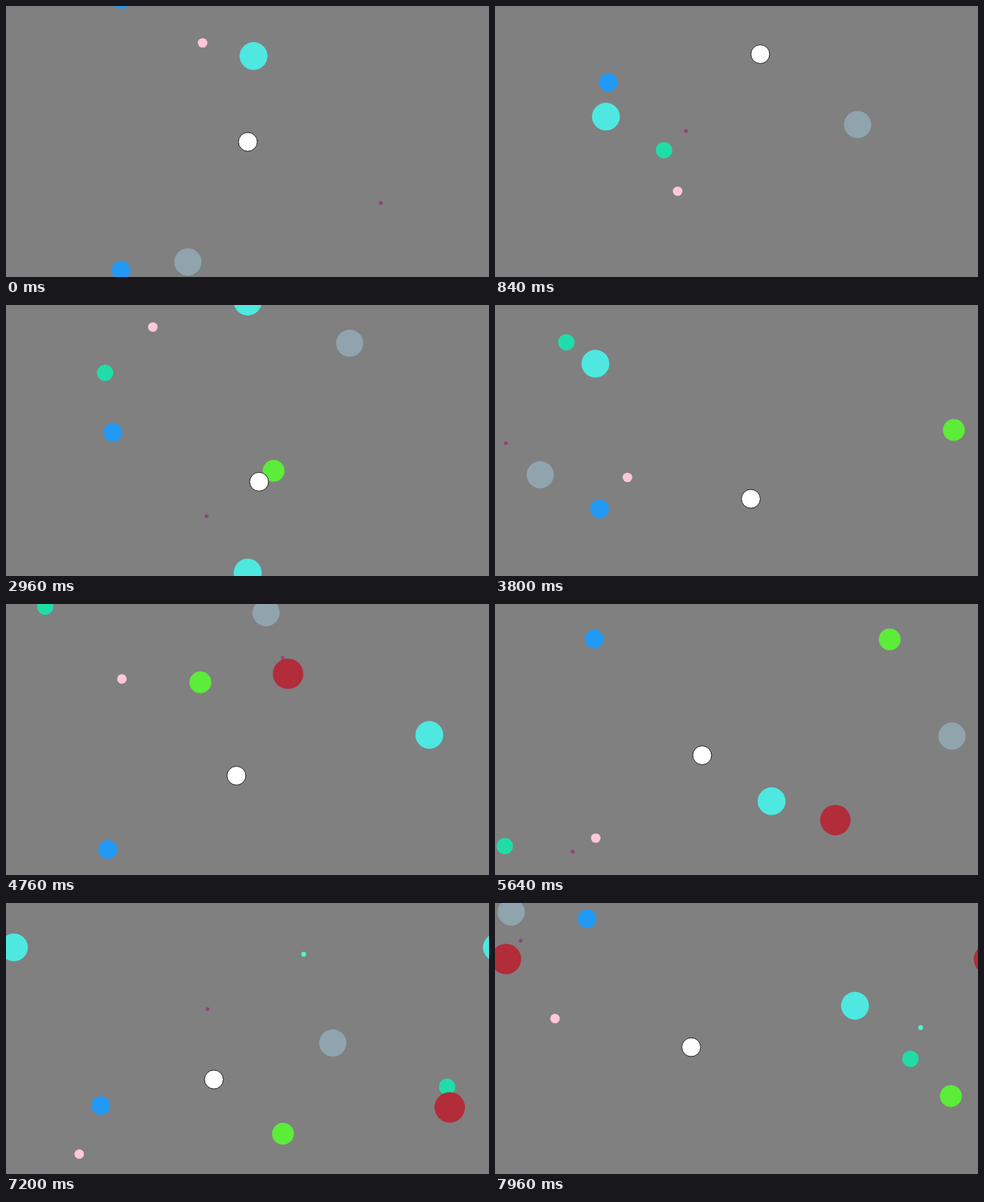
An HTML page with a canvas for the animation above (8000 ms loop, 640x360 px).

```html
<!DOCTYPE html>
<html lang="en">
<head>
<meta charset="utf-8">
<title>Drifting balls</title>
<style>
  html, body { margin: 0; height: 100%; overflow: hidden; background: #808080; }
  canvas { display: block; width: 640px; height: 360px; }
</style>
</head>
<body>
<canvas id="stage" width="640" height="360"></canvas>
<script>
const ctx = document.getElementById('stage').getContext('2d');
const W = 640, H = 360, STEP = 40, STEPS = 200;
const FIRST_BIRTH = 11, BIRTH_GAP = 50;

// Steps at which the paths below have their points; shorter paths end together with the long ones.
const keys = [0, 21, 52, 95, 141, 180, 199];

// Paths are unwrapped: the stage is a torus, so positions may run far past its edges.
const balls = [
  { color: '#2299f5', r: 12.5,
    x: [152.5, 150, 145, 138.5, 131.5, 125.5, 122],
    y: [351, 101.5, -280, -809, -1393.5, -1891, -2139] },
  { color: '#4ee8e0', r: 18.5,
    x: [328, 147, -123.5, -507, -913.5, -1269.5, -1443],
    y: [66.5, 147, 269, 438, 622, 779, 856.5] },
  { color: '#ffc8da', r: 6.3,
    x: [260.5, 242, 214.5, 175.5, 133.5, 97, 79.5],
    y: [49, 246, 540, 949, 1391, 1773.5, 1953.5] },
  { color: '#90a4ae', r: 18,
    x: [241, 480.5, 839, 1340, 1885.5, 2353, 2581.5],
    y: [340, 157.5, -115, -494.5, -904.5, -1254, -1428] },
  { color: '#96427c', r: 2.6,
    x: [496.5, 253, -111, -625.5, -1177, -1653, -1886],
    y: [261.5, 166, 22, -176.5, -391, -579, -670] }
];

// These join one after another at a steady interval.
const newcomers = [
  { color: '#20dda8', r: 10.8,
    x: [224, 170, 94.5, 13, -55.5, -89.5],
    y: [191.5, 132.5, 49.5, -38.5, -116, -153] },
  { color: '#5cec3a', r: 14.5,
    x: [608, 1163, 1647, 1884],
    y: [166, 47, -53.5, -103.5] },
  { color: '#b22c3a', r: 20.2,
    x: [451, 588, 654.5],
    y: [287, 631.5, 794.5] },
  { color: '#56f0cc', r: 3.2,
    x: [394.5, 564],
    y: [68, 165.5] }
].map((ball, i) => ({ ...ball, birth: FIRST_BIRTH + i * BIRTH_GAP }));

const player = { color: '#fff', outline: '#222', r: 12.5,
  x: [320.5, 351.5, 331.5, 339, 274.5, 275.5, 260],
  y: [180.5, 64, 211, 257.5, 201, 234.5, 191.5] };

const cast = [...balls, ...newcomers, player];

const wrap = (value, size) => ((value % size) + size) % size;

// Linear between points, extended backwards before the first one.
function along(path, step) {
  const times = keys.slice(-path.length);
  let i = 0;
  while (i < path.length - 2 && step >= times[i + 1]) i++;
  const u = (step - times[i]) / (times[i + 1] - times[i]);
  return path[i] + (path[i + 1] - path[i]) * u;
}

function disc(ball, x, y) {
  ctx.beginPath();
  ctx.arc(x, y, ball.r, 0, 2 * Math.PI);
  ctx.fillStyle = ball.color;
  ctx.fill();
  if (ball.outline) {
    ctx.strokeStyle = ball.outline;
    ctx.stroke();
  }
}

function draw(step) {
  ctx.fillStyle = '#808080';
  ctx.fillRect(0, 0, W, H);
  for (const ball of cast) {
    if (step < ball.birth) continue;
    const x = wrap(along(ball.x, step), W);
    const y = wrap(along(ball.y, step), H);
    // A ball repeats across the sides and from bottom to top, but not from top to bottom.
    for (const dx of [-W, 0, W])
      for (const dy of [-H, 0]) disc(ball, x + dx, y + dy);
  }
}

const start = performance.now();
function tick() {
  const elapsed = performance.now() - start;
  draw(Math.floor(elapsed / STEP) % STEPS);
  requestAnimationFrame(tick);
}
tick();
</script>
</body>
</html>
```
